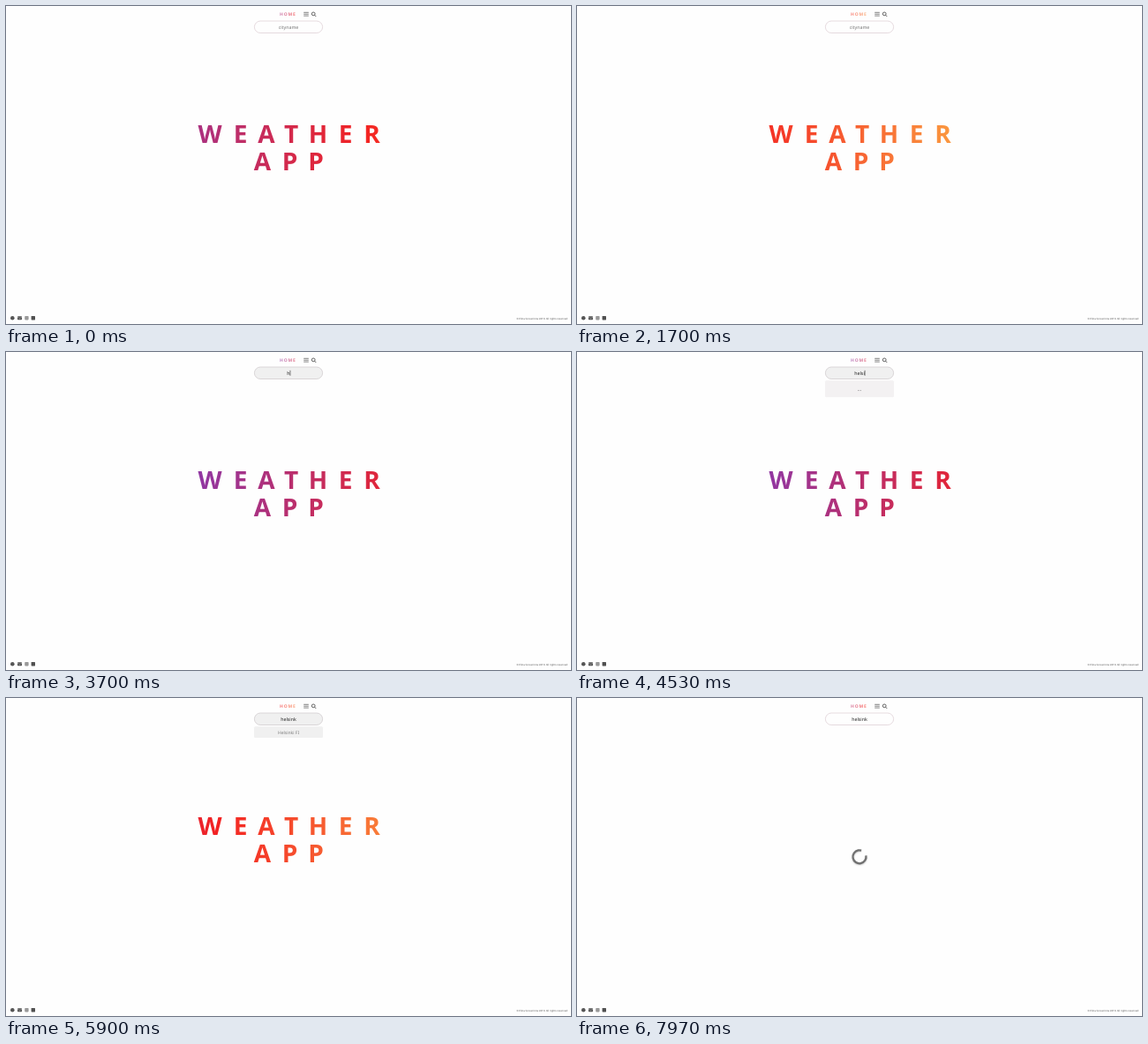
Write an HTML page with a canvas that moves like this. It is 640 by 360 pixels and loops after 8000 ms.

```html
<!DOCTYPE html>
<html lang="en">
<head>
<meta charset="utf-8">
<title>Weather app</title>
<style>
html, body { margin: 0; width: 100%; height: 100%; overflow: hidden; background: #fefefe; }
canvas { display: block; width: 640px; height: 360px; }
</style>
</head>
<body>
<canvas id="stage"></canvas>
<script>
const LOOP = 8000;
const FONT = '"Noto Sans", "Open Sans", sans-serif';
const canvas = document.getElementById('stage');
const ctx = canvas.getContext('2d');
const dpr = window.devicePixelRatio || 1;
canvas.width = 640 * dpr;
canvas.height = 360 * dpr;

const FOCUS = 2600, RESULT = 5200, HOVER = 6450, SUBMIT = 7200;
const WORD = 'helsink';
const KEYS = [3700, 3900, 4080, 4260, 4440, 4720, 4940];

const ramp = (t, start, length) => Math.min(1, Math.max(0, (t - start) / length));
const mix = (a, b, k) => a + (b - a) * k;
const grey = v => `rgb(${v},${v},${v})`;

function text(str, x, y, size, color, weight = 400, align = 'center', spacing = 0) {
  ctx.font = `${weight} ${size}px ${FONT}`;
  ctx.letterSpacing = spacing + 'px';
  ctx.textAlign = align;
  ctx.fillStyle = color;
  ctx.fillText(str, x, y);
}

function box(x, y, w, h, r, fill, stroke) {
  ctx.beginPath();
  ctx.roundRect(x, y, w, h, r);
  ctx.fillStyle = fill;
  ctx.fill();
  if (stroke) {
    ctx.strokeStyle = stroke;
    ctx.lineWidth = 0.8;
    ctx.stroke();
  }
}

function line(x1, y1, x2, y2, color, width) {
  ctx.beginPath();
  ctx.moveTo(x1, y1);
  ctx.lineTo(x2, y2);
  ctx.strokeStyle = color;
  ctx.lineWidth = width;
  ctx.stroke();
}

// A wide gradient slides back and forth behind the letters.
function sweep(x, width, t) {
  const swing = 0.5 + 0.5 * Math.cos((t - 1600) / 5000 * 2 * Math.PI);
  const length = width / 0.35;
  const left = x - (0.03 + 0.53 * swing) * length;
  const g = ctx.createLinearGradient(left, 0, left + length, 0);
  g.addColorStop(0, '#833ab4');
  g.addColorStop(0.5, '#f32222');
  g.addColorStop(1, '#fcb045');
  return g;
}

function header(t) {
  ctx.globalAlpha = 0.62;
  text('HOME', 310, 11, 5, sweep(310, 20, t), 700, 'left', 0.85);
  ctx.globalAlpha = 1;
  for (let i = 0; i < 3; i++) line(337.2, 7.3 + i * 1.9, 342.8, 7.3 + i * 1.9, '#666', 0.8);
  ctx.beginPath();
  ctx.arc(348.2, 8.9, 1.9, 0, 7);
  ctx.strokeStyle = '#555';
  ctx.lineWidth = 0.9;
  ctx.stroke();
  line(349.5, 10.2, 351.2, 11.9, '#555', 1);
}

function search(t) {
  const shade = ramp(t, FOCUS, 200) * (1 - ramp(t, SUBMIT, 120));
  box(281.4, 17, 77.2, 13.5, 6.75, grey(mix(254, 240, shade)),
    shade > 0.5 ? '#d2cdd0' : '#e0d2d7');
  const typed = WORD.slice(0, KEYS.filter(k => t >= k).length);
  if (typed) text(typed, 320, 25.7, 5.3, '#222');
  else text('cityname', 320, 25.7, 5.3, '#777');

  const last = KEYS.filter(k => t >= k).pop() || FOCUS;
  if (t >= FOCUS && t < 5800 && (t - last) % 1000 < 500) {
    ctx.font = `400 5.3px ${FONT}`;
    ctx.letterSpacing = '0px';
    const x = 320.3 + ctx.measureText(typed).width / 2;
    line(x, 20.8, x, 26.8, '#222', 0.6);
  }
}

function suggestions(t) {
  if (t < KEYS[2] || t >= SUBMIT) return;
  if (t < RESULT) {
    box(281, 32.2, 78, 19, 1.5, '#f3f1f2');
    text('...', 320, 44, 5.3, '#333');
  } else {
    const k = ramp(t, HOVER, 200);
    box(281, 32.2, 78, 12.8, 1.5, grey(mix(240, 226, k)));
    text('Helsinki FI', 320, 40.7, 5, grey(mix(125, 40, k)));
  }
}

function heading(t) {
  const fill = sweep(219, 203, t);
  const top = [231, 265.5, 295, 323, 353.5, 384.5, 414.5];
  top.forEach((x, i) => text('WEATHER'[i], x, 155, 28, fill, 600));
  [290.5, 321.5, 351].forEach((x, i) => text('APP'[i], x, 185.5, 28, fill, 600));
}

function spinner(t) {
  const turn = (t - 7970) / 1000 * 2 * Math.PI;
  ctx.save();
  ctx.shadowColor = 'rgba(0,0,0,0.25)';
  ctx.shadowBlur = 2 * dpr;
  ctx.shadowOffsetY = 0.7 * dpr;
  ctx.beginPath();
  ctx.arc(320, 179.8, 7.5, turn - 0.2, turn + 4.98);
  ctx.strokeStyle = '#707070';
  ctx.lineWidth = 2.2;
  ctx.stroke();
  ctx.restore();
}

function footer() {
  box(5, 350.9, 4.6, 4.6, 2.3, '#555');
  box(13, 351.2, 5, 4, 0.6, '#555');
  ctx.beginPath();
  ctx.moveTo(13, 352.1);
  ctx.lineTo(15.5, 353.8);
  ctx.lineTo(18, 352.1);
  ctx.strokeStyle = '#ddd';
  ctx.lineWidth = 0.4;
  ctx.stroke();
  box(21.2, 351, 4.4, 4.4, 0.8, '#999');
  box(28.6, 351, 4.4, 4.4, 0.6, '#505050');
  text('© Elina Sorvarinne 2019. All rights reserved', 636, 354.5, 2.85, '#555', 400, 'right');
}

function draw() {
  const t = performance.now() % LOOP;
  ctx.setTransform(dpr, 0, 0, dpr, 0, 0);
  ctx.textRendering = 'geometricPrecision';
  ctx.fillStyle = '#fefefe';
  ctx.fillRect(0, 0, 640, 360);
  header(t);
  search(t);
  suggestions(t);
  if (t < SUBMIT) heading(t);
  else spinner(t);
  footer();
  requestAnimationFrame(draw);
}
draw();
</script>
</body>
</html>
```
